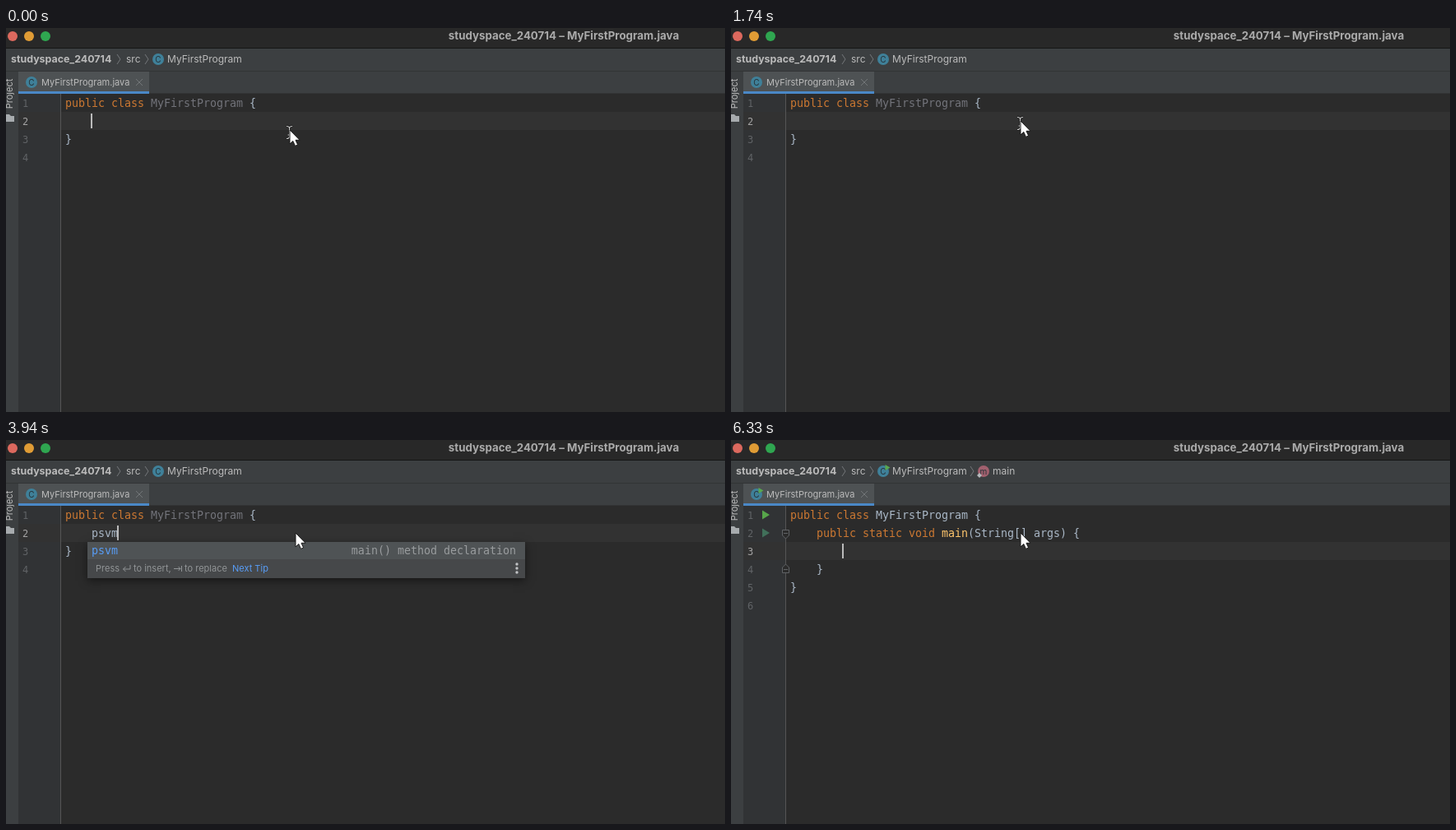
An HTML page with a canvas for the animation above (6.53 s loop, 874 by 467 pixels).

```html
<!DOCTYPE html>
<html lang="en">
<head>
<meta charset="utf-8">
<title>Live template</title>
<style>
  html, body { margin: 0; height: 100%; overflow: hidden; background: #2b2b2b; }
  canvas { display: block; }
</style>
</head>
<body>
<canvas id="stage" width="874" height="467"></canvas>
<script>
const ctx = document.getElementById('stage').getContext('2d');
const LOOP = 6530, ROW = 22, CHAR = 8;
const mono = size => `${size}px "DejaVu Sans Mono", monospace`;
const ui = (size, weight = 400) => `${weight} ${size}px Inter, sans-serif`;
const CODE = mono(13.3);
const KEYWORD = '#cc7832', PLAIN = '#a9b7c6', UNUSED = '#72737a', LABEL = '#bbbbbb', BLUE = '#589df6';

// [time, visible]
const caretBlink = [[0, 1], [260, 0], [800, 1], [1740, 0], [2070, 1], [3460, 0],
  [3940, 1], [4410, 0], [4670, 1], [5800, 0], [6330, 1]];
const keyTimes = [2070, 2340, 2540, 2670];
// [time, x, y] of the pointer tip
const pointerPath = [[260, 345, 124], [730, 341, 115], [930, 341, 115], [1000, 342, 114],
  [1130, 346, 110], [1270, 352, 113]];

function rect(x, y, w, h, color) {
  ctx.fillStyle = color;
  ctx.fillRect(x, y, w, h);
}

function text(str, x, y, font, color, align = 'left') {
  ctx.font = font;
  ctx.fillStyle = color;
  ctx.textAlign = align;
  ctx.fillText(str, x, y);
}

function disc(x, y, r, color) {
  ctx.fillStyle = color;
  ctx.beginPath();
  ctx.arc(x, y, r, 0, 7);
  ctx.fill();
}

function shape(d, { x = 0, y = 0, fill, stroke, width = 1 }) {
  const path = new Path2D(d);
  ctx.save();
  ctx.translate(x, y);
  ctx.lineWidth = width;
  if (fill) { ctx.fillStyle = fill; ctx.fill(path); }
  if (stroke) { ctx.strokeStyle = stroke; ctx.stroke(path); }
  ctx.restore();
}

function code(row, col, parts) {
  for (const [str, color] of parts) {
    text(str, 72 + col * CHAR, 74 + row * ROW, CODE, color);
    col += str.length;
  }
}

function badge(letter, x, y, color) {
  disc(x, y, 7, color);
  text(letter, x, y + 3.5, ui(10), '#273238', 'center');
}

function classBadge(x, y, runnable) {
  badge('C', x, y, '#3f8099');
  if (runnable) shape('M2.5-8L8.5-4.5L2.5-1Z', { x, y, fill: '#59a84f' });
}

const chevron = x => shape('M0-6L4 0L0 6', { x, y: 38, stroke: '#74777a' });
const runIcon = (row, color) => shape('M38-5.5L47 0L38 5.5Z', { y: 69 + row * ROW, fill: color });

function windowFrame(runnable) {
  rect(0, 0, 874, 24, '#282828');
  rect(0, 24, 874, 1, '#151515');
  rect(0, 25, 874, 55, '#3c3f41');
  rect(0, 52, 874, 1, '#323435');
  ['#dc695e', '#e09c35', '#2fa650'].forEach((color, i) => disc(8 + 20 * i, 10, 6, color));
  text('studyspace_240714 – MyFirstProgram.java', 678, 14, ui(13.3, 700), '#aaaaaa', 'center');

  text('studyspace_240714', 6, 42, ui(12.4, 700), LABEL);
  chevron(135);
  text('src', 146, 42, ui(12), LABEL);
  chevron(169);
  classBadge(185, 38, runnable);
  text('MyFirstProgram', 196, 42, ui(12), LABEL);
  if (runnable) {
    chevron(291);
    badge('m', 307, 38, '#a1606e');
    shape('M302 40L305 43L302 46L299 43Z', { fill: '#b4b8bb' });
    text('main', 318, 42, ui(12), LABEL);
  }

  rect(15, 79, 859, 1, '#323435');
  rect(15, 53, 159, 27, '#4e5254');
  rect(15, 77, 159, 3, '#4a88c7');
  classBadge(31, 66, runnable);
  text('MyFirstProgram.java', 43, 70, ui(11), LABEL);
  shape('M158 62L166 70M166 62L158 70', { stroke: '#727678' });
}

function sidebar() {
  rect(0, 53, 15, 414, '#3c3f41');
  ctx.save();
  ctx.translate(8, 80);
  ctx.rotate(-Math.PI / 2);
  text('Project', 0, 0, ui(11), LABEL, 'center');
  ctx.restore();
  shape('M0 105H4L6 107H10V114H0Z', { fill: '#a7abae' });
}

function editor(t, expanded, runnable, analysed) {
  const active = expanded ? 3 : 2;
  rect(15, 80, 51, 387, '#313335');
  rect(67, 80, 807, 387, '#2b2b2b');
  rect(15, 58 + active * ROW, 859, ROW, '#323232');
  rect(66, 80, 1, 387, '#555555');
  for (let n = 1; n <= (expanded ? 6 : 4); n++)
    text(n, 20, 74 + n * ROW, mono(12), n === active ? '#a4a3a3' : '#606366');

  code(1, 0, [['public class ', KEYWORD], ['MyFirstProgram', analysed ? PLAIN : UNUSED], [' {', PLAIN]]);
  const typed = keyTimes.filter(k => t >= k).length;
  if (expanded) {
    code(2, 4, [['public static void ', KEYWORD], ['main', analysed ? '#ffc66d' : PLAIN],
      ['(String[] args) {', PLAIN]]);
    code(4, 4, [['}', PLAIN]]);
    code(5, 0, [['}', PLAIN]]);
  } else {
    code(2, 4, [['psvm'.slice(0, typed), PLAIN]]);
    code(3, 0, [['}', PLAIN]]);
  }

  if (runnable) {
    const fold = { x: 66.5, fill: '#2b2b2b', stroke: '#606366' };
    shape('M-4-5H4V1.5L0 5.5L-4 1.5Z', { ...fold, y: 114.5 });
    shape('M-4 5H4V-1.5L0-5.5L-4-1.5Z', { ...fold, y: 156.5 });
    rect(64, 113, 5, 1, '#606366');
    rect(64, 157, 5, 1, '#606366');
    runIcon(1, analysed ? '#57a64a' : '#4b9350');
  }
  if (analysed) runIcon(2, '#41705a');

  if (caretBlink.findLast(([time]) => t >= time)[1])
    rect(103 + CHAR * (expanded ? 4 : typed), 60 + active * ROW, 2, 18, LABEL);
}

function popup() {
  ctx.save();
  ctx.shadowColor = 'rgba(0,0,0,.5)';
  ctx.shadowBlur = 10;
  ctx.shadowOffsetY = 3;
  rect(99, 124, 532, 44, '#46484a');
  ctx.restore();
  rect(99, 124, 532, 21, '#4f5355');
  text('psvm', 104, 139, CODE, BLUE);
  text('main() method declaration', 620, 139, CODE, '#999c9e', 'right');

  const hint = '#919496';
  text('Press', 109, 160, ui(11), hint);
  shape('M151 152V157H142.5M145.5 154L142.5 157L145.5 160', { stroke: hint });
  text('to insert,', 155, 160, ui(11), hint);
  shape('M204 156.5H212M209.5 154L212 156.5L209.5 159M213.5 153V160', { stroke: hint });
  text('to replace', 217, 160, ui(11), hint);
  text('Next Tip', 275, 160, ui(11), BLUE);
  for (const y of [151, 156, 161]) disc(621, y, 1.7, '#c0c2c4');
}

// The pointer is sampled 15 times a second.
function pointerAt(t) {
  const time = Math.floor((t + 7) * 0.015) / 0.015;
  const next = pointerPath.findIndex(p => p[0] > time);
  if (next < 0) return pointerPath.at(-1).slice(1);
  if (next === 0) return pointerPath[0].slice(1);
  const [t0, x0, y0] = pointerPath[next - 1], [t1, x1, y1] = pointerPath[next];
  const k = (time - t0) / (t1 - t0);
  return [x0 + (x1 - x0) * k, y0 + (y1 - y0) * k];
}

function pointer(t) {
  const [x, y] = pointerAt(t);
  if (t < 2140) {
    const beam = 'M-3.5-7.5Q0-7.5 0-5V5Q0 7.5-3.5 7.5M3.5-7.5Q0-7.5 0-5M0 5Q0 7.5 3.5 7.5M-2 3H2';
    const at = { x: x - 0.5, y: y + 3 };
    shape(beam, { ...at, stroke: '#111111', width: 2.6 });
    shape(beam, { ...at, stroke: '#d0d0d0', width: 1.2 });
  }
  shape('M0 0V17L3.8 13.5L6.5 19.4L9.6 18L7 12.3H12Z',
    { x, y, fill: '#ffffff', stroke: '#1a1a1a' });
}

function draw(now) {
  const t = now % LOOP;
  const expanded = t >= 4670, runnable = t >= 4850, analysed = t >= 5250;
  windowFrame(runnable);
  sidebar();
  editor(t, expanded, runnable, analysed);
  if (t >= 3460 && t < 4410) popup();
  pointer(t);
}

const start = performance.now();
(function tick() {
  draw(performance.now() - start);
  requestAnimationFrame(tick);
})();
</script>
</body>
</html>
```
